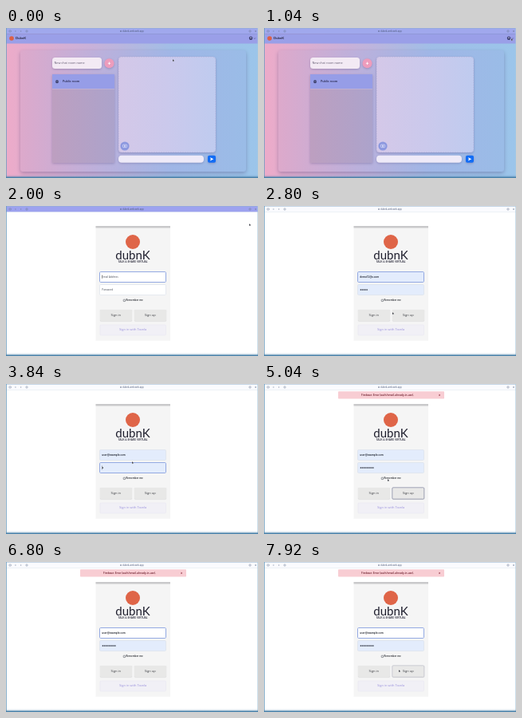
These frames come from a looping animation (316x188 px, 8000 ms). An HTML page with a canvas:

```html
<!DOCTYPE html>
<html lang="en">
<head>
<meta charset="utf-8">
<title>DubnK</title>
<style>
html, body { margin: 0; width: 100%; height: 100%; overflow: hidden; background: #fff; }
canvas { display: block; width: 316px; height: 188px; }
</style>
</head>
<body>
<canvas id="stage"></canvas>
<script>
const W = 316, H = 188, LOOP = 8000, STEP = 80;
const canvas = document.getElementById('stage');
const c = canvas.getContext('2d');
const ratio = window.devicePixelRatio || 1;
canvas.width = W * ratio;
canvas.height = H * ratio;

const SANS = '"Open Sans", "Noto Sans", sans-serif';
const ROUND = 'Lato, Inter, sans-serif';

// time, x, y of the pointer
const path = [
  [80, 209, 39], [880, 310, 13], [1280, 310, 13], [1840, 305, 22],
  [2000, 305, 22], [2720, 161, 133], [2880, 161, 133], [3120, 156, 90],
  [3760, 156, 90], [3920, 160, 104], [4080, 160, 104], [4480, 181, 137],
  [4640, 181, 137], [5040, 155, 119], [5440, 155, 119], [5760, 152, 90],
  [6000, 152, 90], [6400, 172, 116], [7280, 172, 116], [7760, 169, 135]
];

function rect(x, y, w, h, fill, r = 0, line, width = 0.6) {
  c.beginPath();
  c.roundRect(x, y, w, h, r);
  if (fill) { c.fillStyle = fill; c.fill(); }
  if (line) { c.strokeStyle = line; c.lineWidth = width; c.stroke(); }
}

function disc(x, y, r, fill) {
  c.beginPath();
  c.arc(x, y, r, 0, Math.PI * 2);
  c.fillStyle = fill;
  c.fill();
}

function text(s, x, y, size, color, align = 'left', family = SANS, weight = 400) {
  c.font = `${weight} ${size}px ${family}`;
  c.textAlign = align;
  c.textBaseline = 'middle';
  c.fillStyle = color;
  c.fillText(s, x, y);
}

function stroke(points, color, width = 0.6) {
  c.beginPath();
  points.forEach(([x, y], i) => i ? c.lineTo(x, y) : c.moveTo(x, y));
  c.strokeStyle = color;
  c.lineWidth = width;
  c.stroke();
}

function blend(x0, x1, ...colors) {
  const g = c.createLinearGradient(x0, 0, x1, 0);
  colors.forEach((color, i) => g.addColorStop(i / (colors.length - 1), color));
  return g;
}

function shadow(color, blur, dy) {
  c.shadowColor = color;
  c.shadowBlur = blur * ratio;
  c.shadowOffsetY = dy * ratio;
}

function noShadow() { c.shadowColor = 'transparent'; }

function browser(bar) {
  rect(0, 0, W, 7.5, bar);
  const ink = '#6f7a96', thin = 0.5;
  rect(4, 3, 2.4, 2, null, 0.4, ink, thin);
  stroke([[12.4, 3], [11.4, 4], [12.4, 5]], ink, thin);
  stroke([[18.2, 3], [19.2, 4], [18.2, 5]], ink, thin);
  rect(25, 3, 2, 2, null, 0.5, ink, thin);
  disc(144, 4, 0.8, '#4c5878');
  text('dubnk-web.web.app', 146, 4.1, 2.8, '#4c5878');
  rect(305, 3, 2, 2, null, 0.3, ink, thin);
  stroke([[313, 3], [313, 5]], ink, thin);
  stroke([[312, 4], [314, 4]], ink, thin);
}

function edges() {
  const fade = c.createLinearGradient(0, 184, 0, H);
  fade.addColorStop(0, 'rgba(70,125,165,0)');
  fade.addColorStop(0.5, 'rgba(70,125,165,.25)');
  fade.addColorStop(0.75, '#4a82aa');
  fade.addColorStop(1, '#4a82aa');
  rect(0, 0, W, 0.6, '#93b2cf');
  rect(0, 0, 0.8, H, '#6d9fc2');
  rect(W - 0.6, 0, 0.6, H, '#a9c8dd');
  rect(0, 184, W, 4, fade);
}

function chat() {
  rect(0, 0, W, H, blend(0, W, '#edabc9', '#c9b1d9', '#a0bee7', '#9bc5ea'));
  browser('#a0a8ed');
  rect(0, 7.5, W, 12, '#9a9fe8');
  rect(0, 7.3, W, 0.5, '#8389cb');
  disc(7, 13, 2.8, '#dc6046');
  text('DubnK', 12, 13.2, 4.2, '#24233d', 'left', ROUND, 700);
  disc(307, 12.8, 2.2, '#3c3e70');
  disc(307, 12.2, 0.8, '#d2d4f5');
  stroke([[310.8, 12.5], [311.8, 13.5], [312.8, 12.5]], '#3c3e70');

  shadow('rgba(65,55,110,.35)', 5, 2);
  rect(18, 28, 283, 152, blend(18, 301, '#dda9cb', '#bdb0db', '#a0b6e6', '#9abce7'), 3);
  shadow('rgba(65,55,110,.3)', 3, 1);
  rect(58, 37, 62, 14, '#f3eaf4', 3.5);
  disc(129.5, 44.3, 6, '#ed9cbc');
  rect(58, 58, 78, 111, blend(58, 136, '#bd9fc0', '#aca3cb'));
  rect(141, 36, 122, 120, blend(141, 263, '#d4c8e8', '#cbc9ec', '#bfcbef'), 4);
  rect(141, 159.8, 107, 9, '#eeeaf8', 4);
  rect(253, 159.8, 10, 9, '#126cf5', 2);
  noShadow();
  text('New chat room name', 60.5, 44.2, 3.8, '#5f586e');
  stroke([[127.8, 44.3], [131.2, 44.3]], '#fff', 0.8);
  stroke([[129.5, 42.6], [129.5, 46]], '#fff', 0.8);
  rect(58, 58, 78, 18, '#969de7');
  rect(58, 76, 78, 0.6, '#c9bde2');
  disc(64, 67.2, 2, '#34365f');
  stroke([[62.2, 67.2], [65.8, 67.2]], '#a9aff0', 0.5);
  text('Public room', 71, 67.2, 3.7, '#26264b', 'left', SANS, 600);

  c.setLineDash([1.5, 1.5]);
  rect(141.3, 36.3, 121.4, 119.4, null, 4, '#b2aed6');
  c.setLineDash([]);
  disc(149, 148, 5.6, '#8c98df');
  rect(146.4, 146.2, 5.2, 3.4, null, 1, '#eef0ff');
  disc(149, 147.9, 0.9, '#eef0ff');
  c.beginPath();
  c.moveTo(256, 162.2);
  c.lineTo(260.3, 164.3);
  c.lineTo(256, 166.4);
  c.lineTo(256.8, 164.3);
  c.fillStyle = '#fff';
  c.fill();
}

function field(y, value, filled, focused, placeholder, dots) {
  const mid = y + 6.4;
  rect(117.5, y, 83, 13, filled ? '#e3ecfc' : '#fff', 1.2,
    focused ? '#93a9e2' : '#d9dfea', focused ? 1 : 0.6);
  if (dots) {
    for (let i = 0; i < dots; i++) disc(121.3 + i * 1.95, mid, 0.75, '#10141f');
  } else {
    text(value || placeholder, 120.3, mid, 3.1, value ? '#10141f' : '#454a56',
      'left', SANS, value ? 600 : 400);
  }
  if (focused && !value) rect(120, mid - 2.3, 0.4, 4.6, '#333');
}

function button(x, label, line) {
  shadow('rgba(0,0,0,.14)', 1, 0.4);
  rect(x, 130, 40, 14, '#e8e8e7', 1.2);
  noShadow();
  if (line) rect(x - 0.2, 129.8, 40, 14.4, null, 1.2, line, 0.8);
  text(label, x + 19.7, 137, 4.1, '#3f4146', 'center');
}

// values and focus of the form at time t
function formAt(t) {
  const next = 'user@example.com';
  const s = { email: '', filled: false, dots: 0, focus: 'email' };
  if (t >= 2400) Object.assign(s, { email: 'demo12@x.com', filled: true, dots: 5 });
  if (t >= 3040) {
    s.email = next.slice(0, Math.floor((t - 3040) / 40));
    s.filled = t >= 3680;
  }
  if (t >= 3840) {
    s.dots = Math.max(1, Math.min(9, Math.floor((t - 3760) / 50)));
    s.focus = 'password';
  }
  if (t >= 4400) s.focus = 'up';
  if (t >= 5680) { s.focus = 'email'; s.filled = false; }
  return s;
}

function login(t) {
  const s = formAt(t);
  const hover = t >= 7680 ? '#c3c5cd' : null;
  rect(0, 0, W, H, '#fff');
  browser(t < 2240 ? '#9da2ef' : '#fafbfe');
  rect(0, 7, W, 0.5, '#dfe5f0');

  rect(112.5, 25, 93.5, 143.7, '#f5f5f5');
  rect(112.5, 25, 93.5, 2.4, '#c9c9cb');
  disc(159, 45, 9, '#df6548');
  text('dubnK', 159, 62, 15, '#1f1f2e', 'center', ROUND);
  text('TALK & SHARE VIRTUAL', 159, 69.6, 3.3, '#3a3a4a', 'center', ROUND, 700);

  field(82.5, s.email, s.filled, s.focus === 'email', 'Email Address');
  field(98.5, '', s.dots > 0, s.focus === 'password', 'Password', s.dots);
  rect(147.2, 117.2, 2.4, 2.4, '#fff', 0.5, '#4e525b');
  text('Remember me', 150.4, 118.5, 3, '#24272d', 'left', SANS, 600);

  button(118, 'Sign in');
  button(161, 'Sign up', s.focus === 'up' ? '#8b90a8' : hover);
  rect(118, 149, 82.5, 13, '#f1f0f6', 1.2, '#e8e6f1');
  text('Sign in with Tovela', 159.2, 155.2, 4, '#9b91dc', 'center');

  if (t >= 4480) {
    rect(93, 9.3, 133, 9.2, '#f8cdd3', 0.8);
    text('Firebase: Error (auth/email-already-in-use).', 155, 13.8, 3.2,
      '#6b1c2a', 'center', SANS, 600);
    stroke([[219.2, 13], [221, 14.8]], '#8b3040');
    stroke([[221, 13], [219.2, 14.8]], '#8b3040');
  }
}

function pointerAt(t) {
  const i = path.findIndex(p => p[0] > t);
  if (i === 0) return path[0].slice(1);
  if (i < 0) return path[path.length - 1].slice(1);
  const [t0, x0, y0] = path[i - 1], [t1, x1, y1] = path[i];
  const u = (t - t0) / (t1 - t0), e = u * u * (3 - 2 * u);
  return [x0 + (x1 - x0) * e, y0 + (y1 - y0) * e];
}

function pointer(t) {
  if (t >= 6800 && t < 7280) return;
  const [x, y] = pointerAt(t);
  c.beginPath();
  c.moveTo(x, y);
  c.lineTo(x, y + 3.2);
  c.lineTo(x + 0.8, y + 2.5);
  c.lineTo(x + 2.3, y + 2.3);
  c.closePath();
  c.fillStyle = '#22242c';
  c.fill();
  c.strokeStyle = 'rgba(255,255,255,.7)';
  c.lineWidth = 0.3;
  c.stroke();
}

function draw() {
  const t = Math.floor(performance.now() % LOOP / STEP) * STEP;
  c.setTransform(ratio, 0, 0, ratio, 0, 0);
  if (t < 2000) chat(); else login(t);
  edges();
  pointer(t);
  requestAnimationFrame(draw);
}
draw();
</script>
</body>
</html>
```
